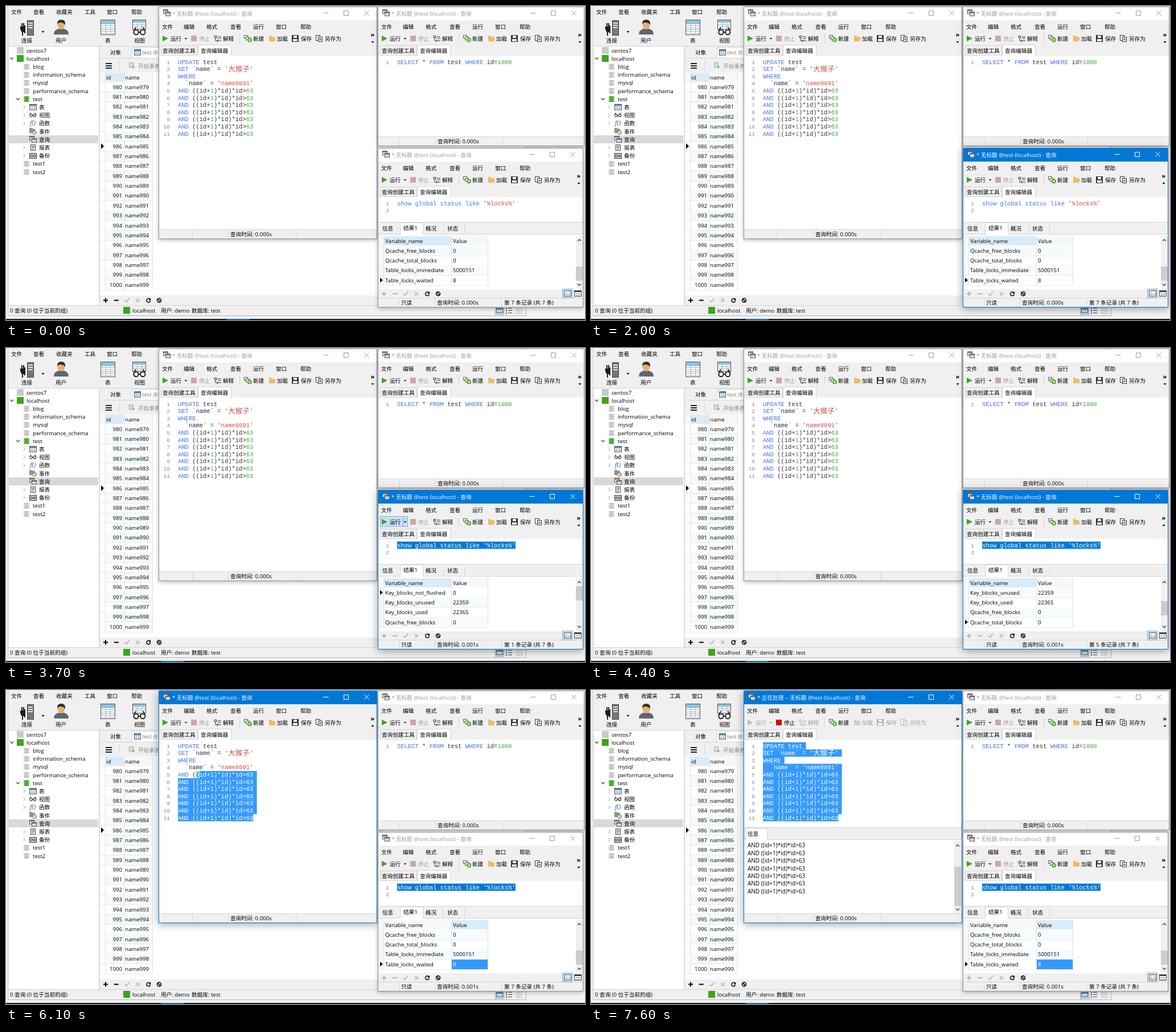
Animation, 1017 px wide and 551 px high, one loop 8000 ms. Source, as an HTML page with a canvas:

```html
<!DOCTYPE html>
<html lang="zh">
<head>
<meta charset="utf-8">
<title>Query windows</title>
<style>
html, body { margin: 0; width: 100%; height: 100%; overflow: hidden; background: #f0f0f0 }
canvas { display: block }
</style>
</head>
<body>
<canvas id="stage" width="1017" height="551"></canvas>
<script>
const g = document.getElementById('stage').getContext('2d');
const FAMILY = '"Open Sans", "Noto Sans CJK SC", "Noto Sans CJK", sans-serif';
const UI = '9.65px ' + FAMILY;
const MONO = '10.5px "Liberation Mono", monospace';
const WIDE = '300 12.4px "Noto Sans CJK SC", "Noto Sans CJK", sans-serif';
const CW = 6.3, LH = 12.6, ROW = 17.36;
const FACE = '#f0f0f0', EDGE = '#d4d4d4', BLUE = '#0078d7', PICK = '#3399ff', GREY = '#a0a0a0', GREEN = '#3ca51e';

const UPDATE = ['UPDATE test', "SET `name` = '大猴子'", 'WHERE', "  `name` = 'name8091'",
  ...Array(7).fill('AND ((id+1)*id)*id>63')];
const SELECT = ['SELECT * FROM test WHERE id=1000'];
const SHOW = ["show global status like '%locks%'", ''];
const STATUS = [['Key_blocks_not_flushed', 0], ['Key_blocks_unused', 22359], ['Key_blocks_used', 22365],
  ['Qcache_free_blocks', 0], ['Qcache_total_blocks', 0], ['Table_locks_immediate', 5000151], ['Table_locks_waited', 8]];

// ---- drawing helpers ----
function rect(x, y, w, h, c) { g.fillStyle = c; g.fillRect(x, y, w, h); }
function box(x, y, w, h, c, fill) {
  if (fill) rect(x, y, w, h, fill);
  g.strokeStyle = c; g.lineWidth = 1; g.strokeRect(x + .5, y + .5, w - 1, h - 1);
}
function text(s, x, y, c = '#000', align = 'left', font = UI) {
  g.font = font; g.textAlign = align; g.fillStyle = c; g.fillText(s, x, y + 3.5);
}
function shape(d, x, y, c) { g.save(); g.translate(x, y); g.fillStyle = c; g.fill(new Path2D(d)); g.restore(); }
function line(d, x, y, c = '#000', w = 1) {
  g.save(); g.translate(x, y); g.strokeStyle = c; g.lineWidth = w; g.stroke(new Path2D(d)); g.restore();
}
function tableIcon(x, y, w, h, head = '#4a90c8', rows = 3) {
  box(x, y, w, h, '#555', '#fff');
  rect(x + 1, y + 1, w - 2, h / 4, head);
  for (let i = 1; i < rows; i++) rect(x + 1, Math.round(y + h / 4 + i * h * .75 / rows), w - 2, 1, '#aab4bb');
  for (let i = 1; i < 3; i++) rect(Math.round(x + i * w / 3), y + h / 4, 1, h * .75, '#aab4bb');
}
function queryIcon(x, y) {
  tableIcon(x, y, 9, 8, '#d0623a', 2);
  tableIcon(x + 4, y + 4, 9, 8, '#4a90c8', 2);
}
function cylinder(x, y, c) {
  for (let i = 0; i < 3; i++) shape('M0 1Q5 -1 10 1V2.5Q5 4.2 0 2.5Z', x, y - 5 + i * 3.4, c);
}
function glasses(x, y, s) {
  g.save(); g.translate(x, y); g.scale(s, s);
  line('M1 -2L3 -5M12 -2L10 -5M5.5 0H7.5M5.5 0a2.4 2.4 0 1 1-4.8 0a2.4 2.4 0 1 1 4.8 0M12.3 0a2.4 2.4 0 1 1-4.8 0a2.4 2.4 0 1 1 4.8 0', 0, 0, '#222', 1.1);
  g.restore();
}
function navButtons(x, y, step, first) {
  const at = i => x + i * step;
  line('M-4 0H4M0 -4V4', at(0), y, first, 2);
  line('M-4 0H4', at(1), y, first, 2);
  line('M-4 0L-1 3L4 -4', at(2), y, '#b4b4b4', 1.5);
  line('M-3 -3L3 3M3 -3L-3 3', at(3), y, '#b4b4b4', 1.5);
  line('M2.6 -2.2A3.4 3.4 0 1 0 3.4 1', at(4), y, '#000', 1.5);
  shape('M4 -4V0H0Z', at(4), y, '#000');
  line('M3.5 0a3.5 3.5 0 1 1-7 0a3.5 3.5 0 1 1 7 0M-2.4 -2.4L2.4 2.4', at(5), y, '#000', 1.5);
}
function scrollBar(x, top, bottom, thumb, size) {
  rect(x, top, 12, bottom - top, FACE);
  rect(x, thumb, 12, size, '#cdcdcd');
  line('M-3 1.5L0 -1.5L3 1.5', x + 6, top + 7, '#444', 1.3);
  line('M-3 -1.5L0 1.5L3 -1.5', x + 6, bottom - 7, '#444', 1.3);
}
function labels(words, xs, dx, y) { words.split(' ').forEach((s, i) => text(s, xs[i] + dx, y)); }

// ---- code editor ----
function tokenColor(s) {
  if (s[0] === "'") return '#c8504a';
  if (/^\d/.test(s)) return '#45a645';
  return /^([A-Z]+|show|global|status|like)$/.test(s) ? '#4a74ee' : '#333';
}
const cells = ch => ch > '\u2e80' ? 2 : 1;
const width = s => [...s].reduce((n, ch) => n + cells(ch), 0);

function code(lines, x, y, sel) {
  lines.forEach((s, i) => {
    const cy = y + i * LH;
    let from = 1e3, to = 0, col = 0;
    if (sel && i >= sel.row) {
      from = i === sel.row ? sel.col : 0;
      to = sel.end ?? width(s) + (i < lines.length - 1 ? 1 : 0);
      if (sel.end && i > sel.row) to = 0;
      if (to > from) rect(x + from * CW, cy - LH / 2, (to - from) * CW, LH + .1, sel.color);
      if (sel.row === 4 && i === 4) rect(x + 5 * CW, cy - LH / 2, CW, LH, '#9af0ee');
    }
    text(i + 1, x - 14, cy, '#8a8a8a', 'right', '9.6px "Liberation Mono", monospace');
    for (const tok of s.match(/'[^']*'|[A-Za-z_]+|\d+|./g) || []) {
      for (const ch of tok) {
        const picked = col >= from && col < to;
        text(ch, x + col * CW, cy + (cells(ch) > 1 ? .8 : 0), picked ? '#fff' : tokenColor(tok), 'left', cells(ch) > 1 ? WIDE : MONO);
        col += cells(ch);
      }
    }
  });
}

// ---- query window ----
function toolbar(dx, y, hover, busy) {
  const off = busy ? GREY : '#000', dark = busy ? '#b0b0b0' : '#333';
  if (hover) {
    box(dx + 272, y - 10, 49, 19, '#7db3dc', '#c4e0f5');
    rect(dx + 312, y - 9, 1, 17, '#7db3dc');
  }
  shape('M0 -5L10 0L0 5Z', dx + 275, y, busy ? '#b9c4b5' : GREEN);
  text('运行', dx + 289, y, off);
  shape('M-2.5 -1H2.5L0 2Z', dx + 316, y, dark);
  rect(dx + 325, y - 5, 10, 10, busy ? '#e00000' : '#c8a9a9');
  text('停止', dx + 339, y, busy ? '#000' : GREY);
  line('M0 -4.5H4V-1.5H0ZM6 -3H12M2 -1V4H5M6 0H12M6 4H12M5.5 2V6', dx + 366, y, dark);
  text('解释', dx + 381, y, off);
  rect(dx + 410, y - 9, 1, 18, EDGE);
  box(dx + 418, y - 6, 7, 6, '#555', '#fff');
  box(dx + 421, y - 3, 7, 6, '#555', '#fff');
  g.fillStyle = '#58b030'; g.beginPath(); g.arc(dx + 428, y + 2.5, 4, 0, 7); g.fill();
  line('M-2 0H2M0 -2V2', dx + 428, y + 2.5, '#fff', 1.2);
  text('新建', dx + 434, y);
  shape('M0 -5H4L5 -3H10V-1H12L10 5H0Z', dx + 462, y, busy ? '#cfcfcf' : '#eebc62');
  text('加载', dx + 476, y, off);
  box(dx + 502, y - 6, 12, 12, dark, dark);
  rect(dx + 505, y - 5, 6, 4, '#fff'); rect(dx + 504, y + 1, 8, 4, '#fff');
  text('保存', dx + 518, y, off);
  box(dx + 544, y - 6, 8, 10, dark, '#fff');
  box(dx + 548, y - 3, 8, 9, dark, '#fff');
  rect(dx + 550, y, 4, 1, dark); rect(dx + 550, y + 2, 4, 1, dark);
  text('另存为', dx + 560, y, off);
}

function windowFrame(x, y, w, h, o) {
  const dx = x - 268, dy = y - 1, right = x + w, foot = y + h - 17;
  g.save();
  g.shadowColor = o.active ? 'rgba(0,0,0,.4)' : 'rgba(0,0,0,.28)';
  g.shadowBlur = o.active ? 14 : 7; g.shadowOffsetY = 2;
  rect(x, y, w, h, FACE);
  g.restore();
  rect(x, y, w, 24, o.active ? BLUE : '#fff');
  queryIcon(dx + 276, y + 5);
  const ink = o.active ? '#fff' : '#999';
  text((o.busy ? '* 正在处理 -- ' : '* ') + '无标题 @test (localhost) - 查询', dx + 292, dy + 13, ink);
  line('M-4.5 .5H4.5', right - 90, dy + 12, ink);
  line('M-4 -4H4V4H-4Z', right - 54.5, dy + 12.5, ink);
  line('M-4 -4L4 4M4 -4L-4 4', right - 18.5, dy + 12.5, ink);

  labels('文件 编辑 格式 查看 运行 窗口 帮助', [274, 312, 352, 394, 434, 474, 517], dx, dy + 36);
  toolbar(dx, dy + 57, o.hover, o.busy);
  text('»', right - 8, dy + 50, '#000', 'center', 'bold 11px ' + FAMILY);
  shape('M-2.5 -1H2.5L0 2Z', right - 8, dy + 63, '#000');

  box(dx + 272, dy + 69, 65, 18, EDGE, o.tabHover ? '#d8ebf8' : FACE);
  text('查询创建工具', dx + 275, dy + 78);
  rect(x + 1, dy + 87, w - 2, foot - dy - 87, '#fff');
  box(dx + 337, dy + 68, 59, 20, EDGE, '#fff');
  rect(dx + 338, dy + 86, 57, 3, '#fff');
  text('查询编辑器', dx + 342, dy + 78);
  code(o.lines, dx + 302, dy + 98, o.sel);

  rect(x + 1, foot, w - 2, 16, FACE);
  rect(x + 1, foot, w - 2, 1, EDGE);
  for (const s of o.seps) rect(s, foot + 2, 1, 13, EDGE);
  text(`查询时间: 0.00${o.millis || 0}s`, o.seps[1] + 4, foot + 8.5);
  box(x, y, w, h, o.active ? BLUE : '#8f8f8f');
}

function results(record, cellPicked) {
  rect(654, 380, 359, 132, FACE);
  rect(654, 379, 359, 1, EDGE);
  rect(654, 400, 359, 97, '#fff');
  rect(654, 400, 359, 1, EDGE);
  for (const x of [768, 805]) rect(x, 382, 1, 18, EDGE);
  box(692, 380, 41, 21, EDGE, '#fff');
  rect(693, 399, 39, 3, '#fff');
  labels('信息 概况 状态', [661, 737, 775], 0, 390);
  text('结果1', 698, 389);
  const top = Math.max(0, record - 4);
  rect(654, 403, 10, 87, '#f7f7f7');
  rect(664, 404, 119, 16, cellPicked ? '#f7f7f7' : '#d9ebf9');
  rect(783, 404, 63, 16, cellPicked ? '#d9ebf9' : '#f7f7f7');
  text('Variable_name', 666, 412);
  text('Value', 785, 412);
  STATUS.slice(top, top + 4).forEach(([name, value], i) => {
    const cy = 429 + i * ROW, y = Math.round(cy - 8.5), last = top + i === 6;
    if ((top + i) % 2) rect(664, y, 182, 17, '#f6fbfe');
    if (last && cellPicked) rect(783, y, 63, 17, PICK);
    text(name, 666, cy);
    text(value, 785, cy, last && cellPicked ? '#fff' : '#000');
    rect(654, y + 17, 192, 1, '#ececec');
    if (top + i === record - 1) shape('M0 -4L5 0L0 4Z', 657, cy, '#000');
  });
  for (const x of [663, 782, 846]) rect(x, 404, 1, 86, '#e2e2e2');
  scrollBar(1001, 404, 496, 418 + 6.5 * (record - 1), 25);
  navButtons(664, 505, 19, '#b4b4b4');
  box(977, 496, 18, 17, '#7db3dc', '#cce4f7');
  tableIcon(980, 499, 13, 11, '#e8f0f6');
  box(998, 499, 13, 11, '#444', '#fff');
  rect(998, 499, 13, 3, '#444'); rect(1000, 504, 9, 1, '#888'); rect(1000, 507, 9, 1, '#888');
  text('只读', 694, 520.5);
  text(`第 ${record} 条记录 (共 7 条)`, 875, 520.5);
}

function messages(scrolled) {
  rect(269, 241, 382, 151, FACE);
  rect(269, 241, 382, 1, EDGE);
  rect(269, 262, 382, 130, '#fff');
  rect(269, 262, 382, 1, EDGE);
  box(272, 242, 38, 21, EDGE, '#fff');
  rect(273, 261, 36, 3, '#fff');
  text('信息', 275, 252);
  const rows = scrolled ? UPDATE.slice(4) : UPDATE.slice(0, 9);
  rows.forEach((s, i) => text(s, 275, 272.7 + i * 13.45, '#000', 'left', '10px ' + FAMILY));
  scrollBar(638, 266, 392, scrolled ? 310 : 280, 69);
}

// ---- main window ----
function tree() {
  rect(5, 71, 158, 454, '#fff');
  rect(5, 227, 157, 14, '#d9d9d9');
  const names = 'centos7 localhost blog information_schema mysql performance_schema test 表 视图 函数 事件 查询 报表 备份 test1 test2'.split(' ');
  names.forEach((s, i) => {
    const y = 78 + i * 14.2, child = i > 6 && i < 14;
    text(s, i < 2 ? 36 : child ? 58 : 47, y);
    if (i < 2) rect(19, Math.round(y - 6), 12, 12, i ? GREEN : '#c9c9c9');
    else if (!child) cylinder(31, y, i === 6 ? GREEN : '#c2c2c2');
    if (i === 1 || i === 6) line('M-3 -1.5L0 1.5L3 -1.5', i === 1 ? 10 : 21, y, '#333', 1.2);
    if ([7, 8, 9, 12, 13].includes(i)) line('M-1.5 -3L1.5 0L-1.5 3', 32, y, '#999');
  });
  tableIcon(41, 172, 13, 11);
  glasses(41, 192, .95);
  text('f()', 42, 205, '#2a65a0', 'left', 'italic 10px "Noto Serif", serif');
  shape('M0 0H5L6 1.5H10V9H0Z', 41, 214, '#8d9a80');
  g.fillStyle = '#fff'; g.beginPath(); g.arc(50, 222, 3.5, 0, 7); g.fill();
  line('M3.5 0a3.5 3.5 0 1 1-7 0a3.5 3.5 0 1 1 7 0M0 -2V0H2', 50, 222, '#3a6b30');
  queryIcon(41, 228);
  box(43, 243, 9, 11, '#444', '#fff');
  line('M2 3H7M2 5H7M3 9V7M5 9V6', 43, 243, '#444');
  box(41, 258, 13, 10, '#333', '#ddd');
  line('M6 5a2 2 0 1 1-4 0a2 2 0 1 1 4 0M11 5a2 2 0 1 1-4 0a2 2 0 1 1 4 0', 41, 258, '#222');
}

function dataGrid() {
  rect(165, 116, 748, 392, '#fff');
  rect(165, 116, 92, 18, '#f7f7f7');
  rect(174, 117, 33, 16, '#d9ebf9');
  text('id', 176, 125);
  text('name', 209, 125);
  for (let i = 0; i <= 20; i++) {
    const cy = 142 + i * ROW, y = Math.round(cy - 8.7);
    if (i % 2) rect(174, y, 83, 17, '#f4fafe');
    rect(165, y + 17, 92, 1, '#e8e8e8');
    text(980 + i, 204, cy, '#000', 'right');
    text('name' + (979 + i), 209, cy);
  }
  for (const x of [174, 207, 257]) rect(x, 117, 1, 381, '#e0e0e0');
  shape('M0 -5L5 0L0 5Z', 167, 246, '#000');
}

function mainWindow(t) {
  rect(0, 0, 1017, 551, '#f3f3f3');
  rect(4, 0, 909, 543, FACE);
  labels('文件 查看 收藏夹 工具 窗口 帮助', [9, 48, 88, 138, 177, 220], 0, 10);
  labels('连接 用户 表 视图', [27, 87, 174, 225], 0, 60);
  box(37, 25, 12, 27, '#444', '#777');
  for (const y of [29, 33, 37]) rect(39, y, 8, 2, '#e5e5e5');
  shape('M25 36H32V34H34V48H32V46H28Q24 41 25 36ZM27 30H29V36H27ZM30 30H32V36H30ZM28 46H30V52H28Z', 0, 0, '#1c1c1c');
  shape('M-2.5 -1H2.5L0 2Z', 65, 45, '#000');
  shape('M-13 13Q-13 5 -5 3H5Q13 5 13 13Z', 97, 37, '#5f6670');
  g.fillStyle = '#e2b072'; g.beginPath(); g.ellipse(97, 33, 6.5, 8, 0, 0, 7); g.fill();
  shape('M-7 0Q-8 -9 0 -9Q8 -9 7 0Q4 -4 -2 -4Q-6 -4 -7 0Z', 97, 33, '#3b2c22');
  tableIcon(166, 24, 26, 27, '#8cc3df', 6);
  tableIcon(222, 24, 24, 18, '#8cc3df', 4);
  glasses(223, 46, 1.75);
  rect(4, 70, 909, 1, EDGE);
  tree();
  rect(163, 71, 2, 454, '#dcdcdc');
  text('对象', 183, 81);
  box(221, 72, 60, 20, EDGE, '#fff');
  tableIcon(225, 76, 12, 11);
  text('test @', 239, 81, '#777');
  rect(165, 91, 748, 1, EDGE);
  for (const y of [100, 104, 108]) rect(175, y, 11, 2, '#222');
  rect(199, 96, 1, 17, EDGE);
  box(216, 99, 8, 9, '#aaa', '#ddd');
  shape('M0 -3L5 0L0 3Z', 222, 107, '#9bb58f');
  text('开始事务', 232, 105, '#8c8c8c');
  dataGrid();
  rect(165, 508, 748, 17, FACE);
  navButtons(175, 516.5, 18.8, '#000');
  rect(4, 525, 909, 1, EDGE);
  text('0 查询 (0 位于当前的组)', 7, 534);
  rect(206, 528, 12, 12, GREEN);
  text('localhost', 222, 534);
  text('用户: demo', 272, 534);
  text('数据库: test', 326, 534);
  box(859, 527, 16, 15, '#7db3dc', '#cce4f7');
  tableIcon(861, 530, 12, 9, '#4a90c8');
  for (const y of [530, 534, 538]) { rect(878, y, 2, 2, '#444'); rect(882, y, 7, 1, '#444'); }
  for (let i = 0; i < 9; i++) rect(896 + i % 3 * 4, 530 + (i / 3 | 0) * 4, 3, 2, '#c4c4c4');
  rect(3, 0, 1, 544, '#c8c8c8');
  rect(913, 0, 1, 544, '#b8b8b8');
  rect(3, 543, 911, 1, '#b8b8b8');
  rect(0, 549, 1017, 2, '#17222c');
  rect(t < 1400 ? 388 : 272, 549, 40, 2, '#1a6fb5');
}

// ---- timeline ----
const during = (t, a, b) => t >= a && t < b;
// value of the last [time, value] pair already reached
const latest = (t, steps) => steps.reduce((v, [at, next]) => t >= at ? next : v, undefined);

function draw(t) {
  mainWindow(t);
  const start = latest(t, [[6000, [8, 8]], [6100, [4, 6]], [6200, [2, 3]], [6300, [0, 4]], [6400, [0, 0]]]);
  windowFrame(268, 1, 384, 408, {
    lines: UPDATE, active: t >= 5900, busy: t >= 7500, hover: during(t, 6800, 7500),
    sel: start && { row: start[0], col: start[1], color: PICK }, seps: [327, 390, 509]
  });
  if (during(t, 6400, 7000)) rect(302, 92, 1, 12, '#000');
  if (t >= 7500) messages(t >= 7600);

  windowFrame(653, 1, 363, 245, { lines: SELECT, seps: [690, 754, 872] });

  const end = latest(t, [[2400, 10], [2500, 24], [2600, 33]]);
  const record = latest(t, [[0, 7], [3700, 1], [4300, 4], [4400, 5], [4500, 6], [4700, 7]]);
  windowFrame(653, 249, 361, 280, {
    lines: SHOW, active: during(t, 1400, 5900), tabHover: during(t, 1700, 1900),
    hover: during(t, 3300, 3600) || during(t, 3700, 3900), busy: during(t, 3600, 3700),
    sel: end && { row: 0, col: 0, end, color: BLUE }, seps: [690, 753, 870], millis: t >= 3700 ? 1 : 0
  });
  if (during(t, 2600, 2900)) rect(895, 340, 1, 12, '#000');
  results(record, t >= 5300);
}

const begin = performance.now();
(function tick() {
  draw((performance.now() - begin) % 8000);
  requestAnimationFrame(tick);
})();
</script>
</body>
</html>
```
